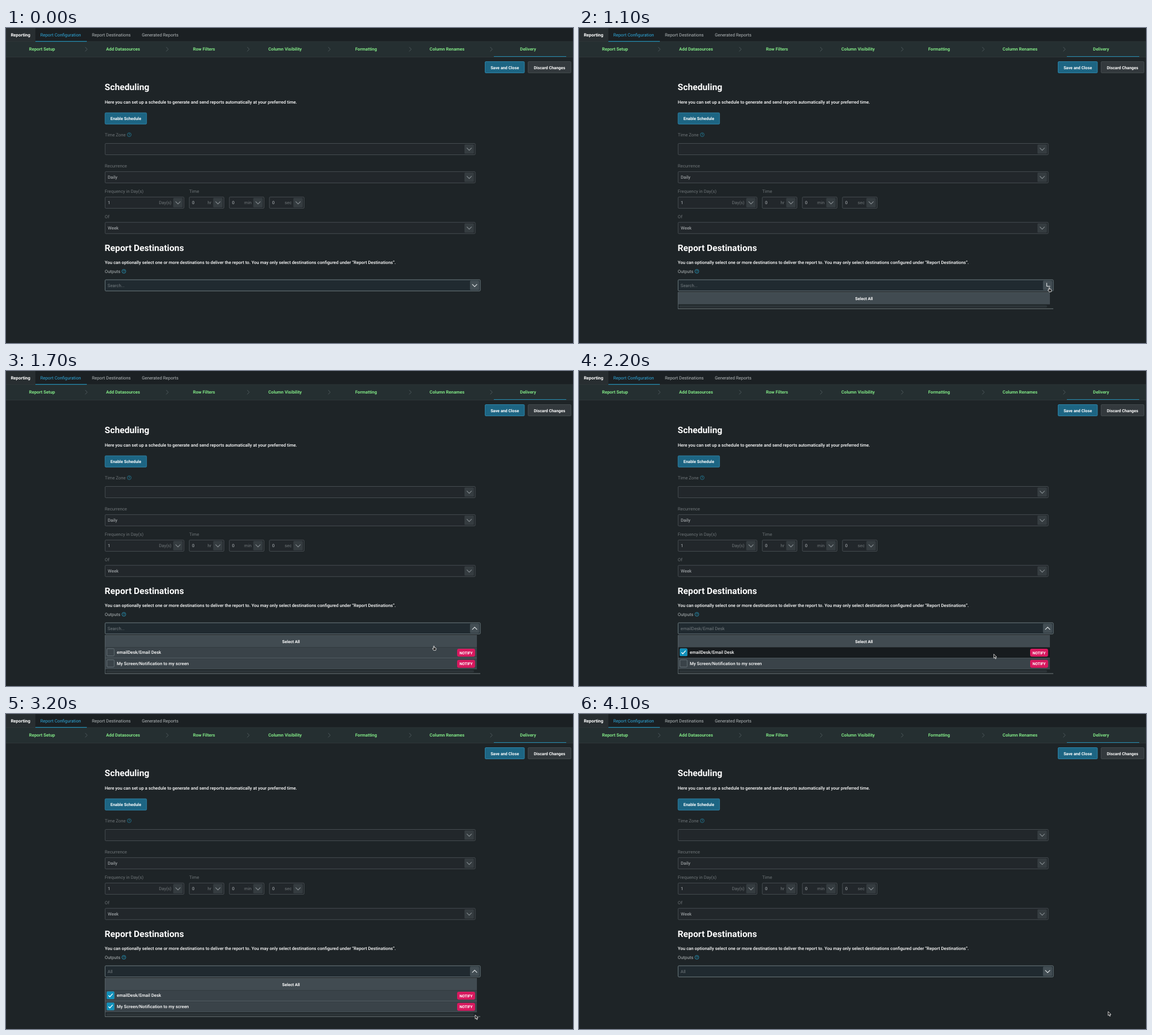
An HTML page for the animation above (4.67 s loop, 1003x558 px).

```html
<!DOCTYPE html>
<html lang="en">
<head>
<meta charset="utf-8">
<title>Report delivery</title>
<style>
  html, body { margin: 0; width: 100%; height: 100%; overflow: hidden; background: #1e2427; }
  svg { display: block; width: 100%; height: 100%; }
  text { font-family: Roboto, sans-serif; white-space: pre; text-rendering: geometricPrecision; }
</style>
</head>
<body>
<svg id="stage" viewBox="0 0 1003 558"></svg>
<script>
const LOOP = 4670, STEP = 100;
const WHITE = '#fff', DIM = '#6e7477', VALUE = '#969b9e', GREEN = '#80e585', BLUE = '#2fa9dc';

// y is the middle of the capital letters
const text = (s, x, y, fill = WHITE, { size = 7.8, weight = 400, anchor = 'start', id = '' } = {}) =>
  `<text id="${id}" x="${x}" y="${y + size * 0.36}" fill="${fill}" font-size="${size}" font-weight="${weight}" text-anchor="${anchor}">${s}</text>`;
const rect = (x, y, w, h, fill, stroke = 'none', r = 0, extra = '') =>
  `<rect x="${x}" y="${y}" width="${w}" height="${h}" rx="${r}" fill="${fill}" stroke="${stroke}" ${extra}/>`;
const path = (d, stroke, width = 1, extra = '') =>
  `<path d="${d}" fill="none" stroke="${stroke}" stroke-width="${width}" ${extra}/>`;
const chevron = (x, y, color, id = '') =>
  `<g transform="translate(${x} ${y})">${path('M-4.3-2.1 0 2.2 4.3-2.1', color, 1.1, `id="${id}"`)}</g>`;
const help = (x, y, color) =>
  `<circle cx="${x}" cy="${y}" r="3.4" fill="none" stroke="${color}" stroke-width=".8"/>` +
  text('?', x, y, color, { size: 5.4, weight: 500, anchor: 'middle' });
const button = (label, x, y, w, fill, stroke) =>
  rect(x, y, w, 20, fill, stroke, 1.5, 'stroke-width=".9"') +
  text(label, x + w / 2, y + 10.4, WHITE, { size: 7.3, weight: 700, anchor: 'middle' });

function field(x, y, w, value = '', unit = '') {
  const bx = x + w - 19;
  return rect(x, y, w, 20, '#22272b', '#4b5256', 1.5, 'stroke-width=".9"') +
    text(value, x + 4.7, y + 10, VALUE, { weight: 500 }) +
    text(unit, bx - 3, y + 10, DIM, { anchor: 'end' }) +
    rect(bx, y + 1.7, 16.8, 16.6, '#353c40', 'none', 1.5) +
    chevron(bx + 8.4, y + 10, '#858c90');
}

function header() {
  const steps = ['Report Setup', 'Add Datasources', 'Row Filters', 'Column Visibility',
    'Formatting', 'Column Renames', 'Delivery'];
  return rect(0, 0, 1003, 24, '#1b2023') + rect(0, 0, 52, 24, '#282e31') +
    text('Reporting', 8.4, 12.2, WHITE, { weight: 700 }) +
    text('Report Configuration', 60.8, 12.2, BLUE) +
    text('Report Destinations', 152, 12.2, '#b4b9bb') +
    text('Generated Reports', 240.2, 12.2, '#b4b9bb') +
    rect(0, 24, 1003, 27.5, '#252f31') +
    path('M0 24H1003M0 51.5H1003', '#30393b', .8) +
    path('M52 23.6H143M863 50.5H991', '#238cb1', 1.2) +
    steps.map((s, i) => {
      const x = 63.7 + i * 143.3;
      return text(s, x, 37.6, GREEN, { weight: 700, anchor: 'middle' }) +
        (i < 6 ? path(`M${x + 76.4} 33.8l3.6 3.8-3.6 3.8`, '#535e61', .9) : '');
    }).join('');
}

function form() {
  const heading = { size: 15.7, weight: 700 }, medium = { weight: 500 };
  return button('Save and Close', 847.5, 59.5, 69.5, '#1d6583', '#2f8bb0') +
    button('Discard Changes', 923.5, 59.5, 76, '#33393d', '#454c50') +
    text('Scheduling', 174.6, 104, WHITE, heading) +
    text('Here you can set up a schedule to generate and send reports automatically at your preferred time.', 174.8, 131, WHITE, medium) +
    button('Enable Schedule', 175.2, 150.2, 73.5, '#1d6583', '#2f8bb0') +
    text('Time Zone', 174.8, 189.2, DIM) + help(218, 189, '#23809f') +
    field(175.3, 204.5, 654.7) +
    text('Recurrence', 174.8, 244.2, DIM) +
    field(175.3, 254.4, 654.7, 'Daily') +
    text('Frequency in Day(s)', 174.8, 289.2, DIM) + text('Time', 324, 289.2, DIM) +
    field(175.3, 299.4, 139.5, '1', 'Day(s)') +
    [['hr', 324.2], ['min', 395.1], ['sec', 466]].map(([u, x]) => field(x, 299.4, 61.3, '0', u)).join('') +
    text('Of', 174.8, 334, DIM) +
    field(175.3, 344.2, 654.7, 'Week') +
    text('Report Destinations', 174.6, 389, WHITE, heading) +
    text('You can optionally select one or more destinations to deliver the report to. You may only select destinations configured under “Report Destinations”.', 174.8, 415.4, WHITE, medium) +
    text('Outputs', 174.8, 431.6, '#b0b6b8') + help(208.5, 431, '#29a3c9') +
    rect(175.3, 446, 663.7, 19.8, '#202a30', '#78868b', 1.5, 'stroke-width=".9"') +
    text('', 179.8, 456, '#737b7f', { id: 'search' }) +
    rect(820.8, 447.6, 16.4, 16.6, '#434e54', 'none', 1.5) +
    chevron(829, 456, '#e4e8ea', 'arrow');
}

function row(i, label) {
  const y = 489.5 + i * 19.7;
  return rect(175.5, y, 657.5, 18.9, '#3a4349', 'none', 0, `id="row${i}"`) +
    path(`M175.5 ${y + 19}H833`, '#616c71', .8) +
    rect(178.5, y + 2.4, 12.8, 12.8, 'none', '#68747a', 1.5, 'stroke-width=".9"') +
    `<g id="check${i}">` + rect(178.2, y + 2.1, 13.4, 13.4, '#1190ba', 'none', 1.5) +
    path(`M181.3 ${y + 9}l2.4 2.5 5-5.6`, WHITE, 1.4) + '</g>' +
    text(label, 196, y + 8.9, WHITE, { weight: 500 }) +
    rect(798, y + 2.6, 31.8, 14, '#d8195f', 'none', 3) +
    text('NOTIFY', 813.9, y + 9.8, WHITE, { size: 6.8, weight: 700, anchor: 'middle' });
}

const panel = () =>
  '<clipPath id="window"><rect id="clip" x="175" y="489.5" width="660" height="39"/></clipPath>' +
  '<g id="panel">' +
  rect(175.5, 468.5, 657.5, 21, '#414b51') + path('M175.3 468.3H833', '#5d686d', .8) +
  text('Select All', 504.2, 479.4, WHITE, { size: 7.3, weight: 700, anchor: 'middle' }) +
  `<g clip-path="url(#window)">${row(0, 'emailDesk/Email Desk')}${row(1, 'My Screen/Notification to my screen')}</g>` +
  rect(834, 470, 4, 55, '#30383c', 'none', 2, 'id="thumb"') +
  '<g id="foot">' + rect(177, 491.2, 651, 4, '#2c3438', 'none', 2) +
  path('M175 497.3H839', '#7b868a', .9) + '</g>' +
  path('', '#68747a', .8, 'id="side"') + '</g>';

const cursor = () => '<g id="cursor" stroke="#fff" stroke-width=".8" stroke-linejoin="round" fill="#111">' +
  '<path id="pointer" d="M0 0V7.2L1.7 5.7 2.8 8.4 4 7.9 2.9 5.3H5.1Z"/>' +
  '<path id="hand" fill="#222" d="M-.8.5Q0-.6.7.5V3L3.3 3.6Q4.2 3.9 4 5L3.2 7.8H-.6L-2.5 5Q-2.6 4-1.7 4.1L-.8 4.8Z"/></g>';

const stage = document.getElementById('stage');
stage.innerHTML = rect(0, 0, 1003, 558, '#1e2427') + header() + form() + panel() + cursor();
const el = id => document.getElementById(id);
const show = (id, on) => el(id).setAttribute('visibility', on ? 'inherit' : 'hidden');

// Tracks are [time, ...values], joined by straight lines
const CURSOR = [[300, 929, 467], [400, 914, 468], [500, 880, 465], [600, 849, 460], [700, 834, 459],
  [800, 832, 459.5], [1300, 832, 459.5], [1400, 824, 466], [1500, 799, 477], [1600, 772, 484],
  [1700, 757, 487], [1900, 742, 494], [2100, 733.8, 501.5], [2300, 733.8, 501.5], [2500, 723, 513],
  [2600, 717, 521], [2700, 714.5, 523], [3000, 714.5, 523], [3100, 745, 532], [3200, 830, 533],
  [3300, 910, 531], [3400, 936, 527]];
const TURN = [[1000, 0], [1100, 45], [1200, 140], [1300, 180], [3600, 180], [3700, 165], [3800, 98], [3900, 25], [4000, 0]];
const LIST = [[1100, 0], [1200, 22], [1300, 37], [1400, 38.7], [3700, 38.7], [3800, 36.2], [3900, 15], [4000, 0]];

function at(track, t) {
  const i = track.findIndex(k => k[0] > t);
  if (i === 0) return track[0].slice(1);
  if (i < 0) return track[track.length - 1].slice(1);
  const [a, b] = [track[i - 1], track[i]], p = (t - a[0]) / (b[0] - a[0]);
  return a.slice(1).map((v, j) => v + (b[j + 1] - v) * p);
}

function draw(t) {
  const [x, y] = at(CURSOR, t), [turn] = at(TURN, t), [height] = at(LIST, t);
  const picked = [t >= 2100, t >= 2700];
  const hover = t < 1400 || x > 833 || y < 489.5 ? -1 : y < 508.7 ? 0 : y < 528 ? 1 : -1;
  const overButton = x < 838 && y < 489.5;

  show('cursor', t >= 300);
  show('pointer', t >= 300 && !overButton);
  show('hand', t >= 300 && overButton);
  el('cursor').setAttribute('transform', `translate(${x} ${y})`);

  el('arrow').setAttribute('transform', `rotate(${turn})`);
  el('search').textContent = picked[1] ? 'All' : picked[0] ? 'emailDesk/Email Desk' : 'Search...';

  show('panel', t >= 1100 && t < 4100);
  show('thumb', t >= 3700 && t < 4000);
  el('clip').setAttribute('height', height);
  el('foot').setAttribute('transform', `translate(0 ${height})`);
  el('side').setAttribute('d', `M175.3 468V${497.3 + height}`);
  picked.forEach((on, i) => {
    show('check' + i, on);
    el('row' + i).setAttribute('fill', hover === i ? '#171b1e' : '#3a4349');
  });
}

const start = performance.now();
function tick() {
  const t = (performance.now() - start) % LOOP;
  draw(Math.floor(t / STEP) * STEP);
  requestAnimationFrame(tick);
}
tick();
</script>
</body>
</html>
```
